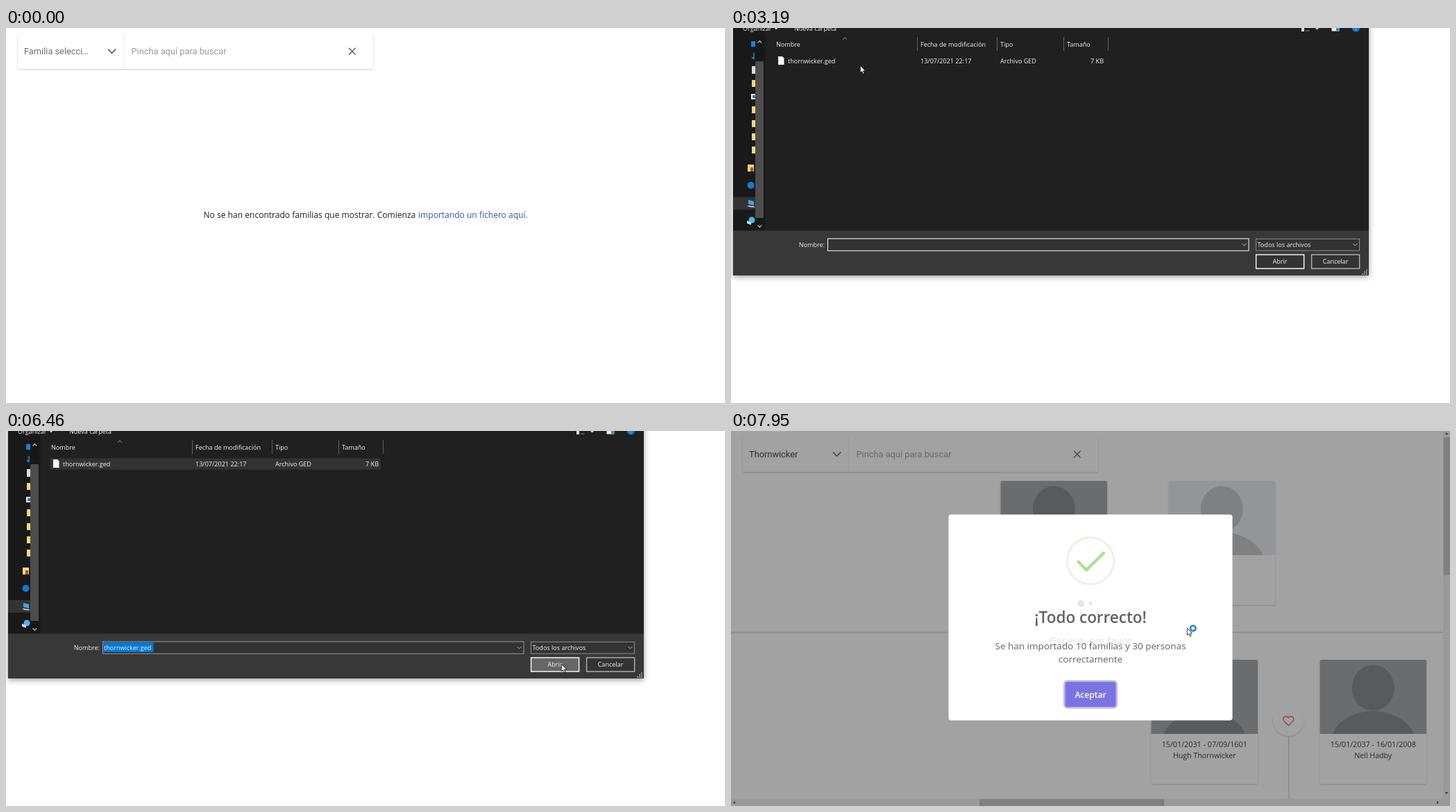
These frames come from a looping animation (1036 by 541 pixels, 8 s). An HTML page:

```html
<!DOCTYPE html>
<html lang="es">
<head>
<meta charset="utf-8">
<title>Importar familias</title>
<style>
html, body { margin: 0; width: 100%; height: 100%; overflow: hidden; background: #fff; }
svg { display: block; width: 1036px; height: 541px; }
text { font-family: "Open Sans", "Noto Sans", sans-serif; white-space: pre; }
.ui { font-family: Roboto, sans-serif; font-size: 12.8px; }
.lift { filter: drop-shadow(0 1px 1.2px rgba(0,0,0,.22)); }
.line { fill: none; stroke-width: 1.4; }
#dialog text { font-size: 9.05px; fill: #f2f2f2; }
</style>
</head>
<body>
<svg id="stage" viewBox="0 0 1036 541"></svg>
<script>
const LOOP = 8000;
const FAMILY = 'Thornwicker', FILE = 'thornwicker.ged';

const text = (x, y, str, attrs = '') => `<text x="${x}" y="${y}" ${attrs}>${str}</text>`;
const rect = (x, y, w, h, fill, attrs = '') =>
  `<rect x="${x}" y="${y}" width="${w}" height="${h}" fill="${fill}" ${attrs}/>`;
const disc = (x, y, r, fill, attrs = '') => `<circle cx="${x}" cy="${y}" r="${r}" fill="${fill}" ${attrs}/>`;
const path = (d, stroke, attrs = '') => `<path class="line" d="${d}" stroke="${stroke}" ${attrs}/>`;
const shape = (d, fill) => `<path d="${d}" fill="${fill}"/>`;
const group = (id, body, attrs = '') => `<g id="${id}" ${attrs}>${body}</g>`;
const middle = 'text-anchor="middle" ';

function card(x, y, dates, name, light) {
  const [back, figure] = light ? ['#e4e7ec', '#bcc2c8'] : ['#9b9ea1', '#7b7d7f'];
  return `<g transform="translate(${x} ${y})">
    ${rect(0, 0, 154, 179, '#fff', 'rx="3" class="lift"')}
    <g clip-path="url(#portrait)">${rect(0, 0, 154, 107, back)}
      <ellipse cx="77" cy="40.5" rx="30.5" ry="33" fill="${figure}"/>
      <ellipse cx="77" cy="122" rx="62" ry="48" fill="${figure}"/></g>
    ${text(77, 126, dates, middle + 'font-size="10.75" fill="#222"')}
    ${text(77, 142, name, middle + 'font-size="10.6" fill="#222"')}</g>`;
}

function tree() {
  return card(1731, 72, '14/02/1990 - 10/02/1561', 'Ralph ' + FAMILY) +
    card(1973, 72, '', '', true) +
    card(1948, 330, '15/01/2031 - 07/09/1601', 'Hugh ' + FAMILY) +
    card(2191, 330, '15/01/2037 - 16/01/2008', 'Nell Hadby') +
    path('M2146.5 441V541', '#ccc') + disc(2146, 418, 22, '#fff', 'class="lift"') +
    path('M2146 425l-6.4-6.6c-3.6-4.4 2.6-9.4 6.4-4.6c3.8-4.8 10 .2 6.4 4.6Z', '#e2603f');
}

function scrollbars() {
  return rect(1026, 0, 10, 541, '#f1f1f1') + rect(0, 530.5, 1036, 10.5, '#f1f1f1') +
    rect(1026.5, 9, 9.5, 199, '#c1c1c1') +
    rect(0, 531, 266, 10, '#c1c1c1', 'id="thumb"') +
    shape('M1028.5 5h5l-2.5-3zM1028.5 521h5l-2.5 3zM6 533.5v5l-3-2.5zM1017 533.5v5l3-2.5z', '#505050');
}

function header() {
  return rect(17, 8, 512, 51, '#fff', 'rx="2" class="lift"') + path('M170 8V59', '#f0f0f0') +
    text(26, 37.7, 'Familia selecci…', 'class="ui" id="family"') +
    path('M147 30.6l5.6 5.6 5.6-5.6', '#45454f') +
    text(180.5, 37.7, 'Pincha aquí para buscar', 'class="ui" fill="#959ba2"') +
    path('M494 28.8l9.6 9.6m0-9.6l-9.6 9.6', '#5b5b68');
}

function emptyNotice() {
  return text(284.5, 274.4, 'No se han encontrado familias que mostrar. Comienza', 'font-size="12.05" fill="#1d1d22"') +
    text(594, 274.4, 'importando un fichero aquí.', 'font-size="12.05" id="link"') +
    rect(593.8, 259.8, 157.6, 19, 'none', 'id="ring" rx="1.6" stroke="#183a78" stroke-width="1.6"');
}

function sidebar() {
  const folder = y => rect(30, y - 5, 5, 10, '#f5d67b');
  return rect(3, 0, 46.5, 292, '#191919') + rect(3, 244, 32, 18, '#333') +
    rect(29, 19, 6, 8, '#1683d8') +
    path('M33 36v9m-3-3l3 3', '#2196e0') +
    rect(30, 55, 5, 11, '#dcdcdc') + rect(29, 95, 6, 8, '#e6eef2') + rect(31, 97, 4, 4, '#4d7188') +
    [80, 118, 138, 157, 176].map(folder).join('') +
    rect(24, 197, 9, 10, '#f5d67b') + rect(28, 201, 4, 6, '#a8542b') +
    disc(28.5, 227, 5, '#0f7bd6') +
    shape('M25 248l8 2v6l-8-2z', '#3aa7ea') + shape('M23 256l9 1 3 2-9-1z', '#ddd') +
    disc(30, 277, 4.5, '#4db3ee') + shape('M23 278l6 2v4l-6-2z', '#bfe2f7') +
    rect(35, 13, 12, 279, '#171717') + rect(35, 48, 12, 226, '#4d4d4d') +
    path('M38.5 21.5l2.8-3 2.8 3M38.5 284.5l2.8 3 2.8-3', '#aaa', 'stroke-width="1"');
}

function dialog() {
  const button = (x, label, stroke, id) =>
    rect(x + .6, 327, 69, 20, '#333', `id="${id}" stroke="${stroke}" stroke-width="1.4"`) +
    text(x + 35, 340.3, label, middle);
  const down = (x, y) => path(`M${x - 3} ${y - 1.5}l3 3 3-3`, '#bbb', 'style="stroke-width:1"');
  let grip = '';
  for (let i = 0; i < 3; i++)
    for (let j = 0; j <= i; j++) grip += rect(915 - j * 2.8, 348.5 + i * 2.8, 1.7, 1.7, '#bbb');

  return rect(3, -40, 916, 397, '#202020', 'style="filter:drop-shadow(0 2px 4px rgba(0,0,0,.4))"') +
    rect(3, 292.5, 916, 64.5, '#383838') + sidebar() +
    text(17, 3.6, 'Organizar') + shape('M62.5 -.5h5l-2.5 3z', '#ddd') + text(91, 3.6, 'Nueva carpeta') +
    rect(822, -4, 4, 9, '#ddd') + path('M828 4h5', '#aaa', 'stroke-dasharray="1 1"') +
    shape('M842 0h5l-2.5 2.5z', '#ddd') +
    rect(865.5, -5, 11, 9.5, '#eee') + rect(872, -2, 4.5, 6, '#2a93dd') +
    disc(900.5, 0, 5.6, '#1277d3') + text(900.5, 3, '?', middle) +
    path('M268.5 13V33M383.5 13V33M479.5 13V33M543.5 13V33', '#606060', 'style="stroke-width:1"') +
    path('M161 16.5l3-2.8 3 2.8', '#999', 'style="stroke-width:1"') +
    text(65, 27, 'Nombre') + text(273, 27, 'Fecha de modificación') + text(388, 27, 'Tipo') + text(484, 27, 'Tamaño') +
    rect(63.5, 39.5, 476, 16, '#777', 'id="row"') +
    shape('M68 41h6l2.5 2.5v9.5h-8.5z', '#f7f7f7') +
    text(82, 51.3, FILE) + text(273, 51.3, '13/07/2021 22:17') +
    text(388, 51.3, 'Archivo GED') + text(537, 51.3, '7 KB', 'text-anchor="end"') +
    text(135, 315.8, 'Nombre:', 'text-anchor="end"') +
    rect(139.5, 303.9, 606.5, 17.4, '#333', 'id="field"') +
    rect(140.5, 305, 72, 14, '#0078d7', 'id="marked"') +
    text(141, 315.8, FILE, 'id="chosen"') + down(739.5, 312.5) +
    rect(756.5, 304.3, 149, 16.8, '#333', 'stroke="#8c8c8c"') +
    text(758.5, 315.8, 'Todos los archivos') + down(899.5, 312.5) +
    button(756, 'Abrir', '#fff', 'open') + button(836, 'Cancelar', '#b5b5b5', 'cancel') + grip;
}

function success() {
  return rect(0, 0, 1036, 541, '#000', 'opacity=".4"') +
    rect(313.5, 120.5, 409, 297, '#fff', 'rx="4"') +
    disc(518, 187.3, 33.6, 'none', 'stroke="#a5dc86" stroke-opacity=".3" stroke-width="3"') +
    path('M500.5 188.5L512 200.5L537 176', '#a5dc86', 'style="stroke-width:4.2" stroke-linecap="round"') +
    text(518, 276.5, '¡Todo correcto!', middle + 'font-size="22.5" font-weight="600" fill="#545454"') +
    text(518, 315, 'Se han importado 10 familias y 30 personas', middle + 'font-size="13.5" fill="#545454"') +
    text(518, 334, 'correctamente', middle + 'font-size="13.5" fill="#545454"') +
    rect(480.2, 360.8, 75.6, 38.4, 'none', 'rx="4.5" stroke="#7066e0" stroke-opacity=".5" stroke-width="2.4"') +
    rect(481.4, 362, 73.2, 36, '#7066e0', 'rx="3"') +
    text(518, 385, 'Aceptar', middle + 'font-size="12" font-weight="600" fill="#fff"');
}

function loader() {
  return rect(0, 0, 1036, 541, '#fff', 'opacity=".7"') +
    [0, 1, 2].map(i => disc(504 + i * 14, 249, 0, '#333', 'class="dot"')).join('') +
    text(518, 307.7, 'Espere, por favor', middle + 'fill="#2b2b2b" style="font:15.36px \'Liberation Sans\',Arial,sans-serif"');
}

const $ = id => document.getElementById(id);
$('stage').innerHTML =
  `<clipPath id="portrait"><path d="M0 107V3q0-3 3-3h148q3 0 3 3v104z"/></clipPath>` +
  group('family-tree', path('M0 290.5H1026', '#ccc') + group('cards', tree()) + scrollbars()) +
  header() + group('notice', emptyNotice()) + group('dialog', dialog()) +
  group('success', success()) + group('loader', loader()) +
  group('cursor',
    '<path d="M.3 .3V10.6L2.6 8.5L4.3 12.3L6 11.5L4.4 7.9H7.6Z" fill="#fff" stroke="#222" stroke-width=".9"/>' +
    disc(8.7, .6, 3.8, '#fff', 'id="busy" stroke="#2f86dd" stroke-width="2.7"'));

// Pointer path: time, x, y
const TRACK = [
  [400, 866, 425], [800, 815, 400], [1060, 815, 400], [1850, 676, 270], [1910, 676, 270],
  [2110, 674, 268], [2310, 674, 268], [2650, 420, 240], [2920, 420, 240], [3190, 186, 54],
  [3500, 133, 42], [4460, 133, 42], [4670, 150, 51], [5060, 150, 51], [5600, 819, 371],
  [5860, 817, 340], [6200, 817, 340], [6270, 816, 335], [6400, 816, 335], [6460, 800, 336],
  [6660, 800, 338], [7400, 657, 286], [7660, 657, 286], [7950, 657, 284], [LOOP, 657, 284]
];

const clamp = v => Math.min(1, Math.max(0, v));
const ramp = (t, start, length) => clamp((t - start) / length);
const set = (id, attrs) => { for (const k in attrs) $(id).setAttribute(k, attrs[k]); };
const show = (id, on) => { $(id).style.display = on ? '' : 'none'; };

function pointer(t) {
  const i = Math.max(1, TRACK.findIndex(p => p[0] > t));
  const [t0, x0, y0] = TRACK[i - 1], [t1, x1, y1] = TRACK[i];
  const u = ramp(t, t0, t1 - t0), k = u * u * (3 - 2 * u);
  return [x0 + (x1 - x0) * k, y0 + (y1 - y0) * k];
}

function drawDialog(t) {
  const enter = 1 - (1 - ramp(t, 2310, 260)) ** 2, leave = ramp(t, 6585, 80);
  const scale = .9 + .1 * enter - .046 * leave;
  set('dialog', {
    opacity: enter * (1 - leave),
    transform: `translate(461 119) scale(${scale}) translate(-461 -119)`
  });
  show('dialog', t >= 2310 && leave < 1);

  const picked = t >= 3700, sent = t >= 6270;
  show('row', t >= 3260);
  set('row', { fill: sent ? '#333' : picked ? '#777' : '#4d4d4d', stroke: picked && !sent ? '#a6a6a6' : 'none' });
  set('field', { stroke: t < 4460 ? '#fff' : '#9b9b9b' });
  show('chosen', picked);
  show('marked', t >= 6460);
  set('open', { fill: sent ? '#666' : t >= 5930 ? '#454545' : '#333' });
}

function drawPage(t) {
  const loaded = t >= 7530;
  show('notice', !loaded);
  show('family-tree', loaded);
  $('family').textContent = loaded ? FAMILY : 'Familia selecci…';
  set('family', { fill: loaded ? '#2b2b2b' : '#6e6e73' });
  set('link', { fill: t < 600 ? '#3457ab' : '#4c7cf0' });
  show('ring', t >= 600 && t < 1940 || t >= 2310);

  const s = Math.min(488, Math.max(0, t - 7500)), scroll = 5.53 * s - .00566 * s * s;
  set('cards', { transform: `translate(${-scroll} 0)` });
  set('thumb', { x: 10 + scroll / 3.857 });
  show('success', t >= 7600);
}

function drawLoader(t) {
  show('loader', t >= 7450);
  set('loader', { opacity: ramp(t, 7450, 50) * (1 - ramp(t, 7623, 372)) });
  document.querySelectorAll('.dot').forEach((dot, i) => {
    const phase = ((t - 7660) / 1400 + 10.77 + (2 - i) * .114) % 1;
    dot.setAttribute('r', phase < .8 ? 7 * Math.sin(phase / .8 * Math.PI) : 0);
  });
}

function frame(now) {
  const t = now % LOOP;
  drawPage(t);
  drawDialog(t);
  drawLoader(t);
  show('cursor', t >= 400);
  set('cursor', { transform: `translate(${pointer(t)})` });
  show('busy', t >= 6600);
  requestAnimationFrame(frame);
}

const start = performance.now();
requestAnimationFrame(function first(now) { frame(Math.max(0, now - start)); });
</script>
</body>
</html>
```
